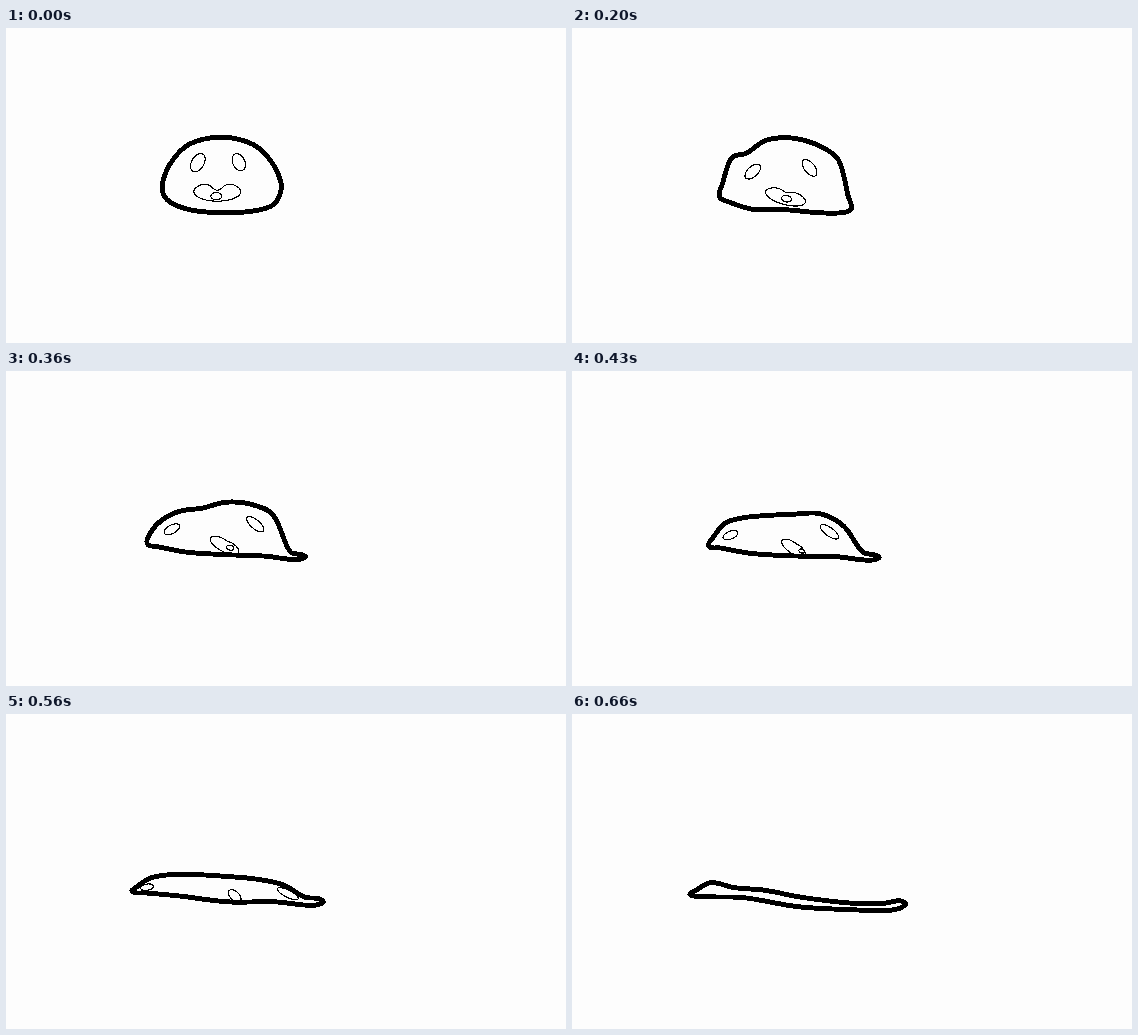
Write an HTML page that moves like this. It is 560 by 315 pixels and loops after 0.7 s.

```html
<!DOCTYPE html>
<html lang="en">
<head>
<meta charset="utf-8">
<title>Melting blob</title>
<style>
  html, body { margin: 0; width: 100%; height: 100%; overflow: hidden; background: #fdfdfd; }
  svg { display: block; width: 100vw; height: 100vh; shape-rendering: crispEdges; }
  path { fill: none; stroke: #000; stroke-width: 1.15; stroke-linejoin: round; }
  #body { stroke-width: 4.9; }
</style>
</head>
<body>
<svg viewBox="-0.3 -0.7 560 315">
  <clipPath id="inside"><path id="hull"/></clipPath>
  <path id="face" clip-path="url(#inside)"/>
  <path id="body"/>
</svg>
<script>
const LOOP = 700, LAST = 20;
const [hull, face, body] = ['hull', 'face', 'body'].map(id => document.getElementById(id));

// Key poses: left and right end, then heights along the top and the bottom
const poses = [
  { step: 0, ends: [156, 162, 275, 160], top: [145, 130, 117, 110.5, 108.5, 111, 118, 131, 146], low: [173.5, 181.5, 184, 182.5, 176] },
  { step: 3, ends: [150, 163, 276, 158], top: [157, 136, 123, 107.5, 104.5, 108, 116, 127.5, 142], low: [173, 183, 183.5, 181, 177] },
  { step: 6, ends: [147, 168, 279, 180], top: [155, 129, 124.5, 112, 109, 112, 119.5, 131.5, 167], low: [173, 180.5, 181, 184, 184] },
  { step: 11, ends: [141, 172, 299, 185.5], top: [160, 148, 139.5, 136.5, 130.5, 132.5, 143, 180, 183], low: [175, 180.5, 183, 184.5, 188] },
  { step: 15, ends: [132, 177, 314, 187], top: [172, 155, 152.5, 151, 154.5, 151.5, 166, 180.5, 183.5], low: [177.5, 183, 185.5, 185.5, 189] },
  { step: 18, ends: [123, 177, 318, 188], top: [172, 167.5, 163.5, 164.5, 165.5, 171, 172.5, 183.5, 184], low: [178.5, 180.5, 188, 188, 191.5] },
  { step: LAST, ends: [118, 180, 333, 190], top: [176, 168, 173, 175.5, 182, 186.5, 189, 188.5, 186], low: [182, 183, 192, 195, 195.5] }
];

const mix = (a, b, k) => a + (b - a) * k;
const mixAll = (a, b, k) => a.map((v, i) => mix(v, b[i], k));
const ease = p => p * p * (3 - 2 * p);
const text = p => p.map(v => v.toFixed(2)).join(' ');

// Heights get closer together towards both ends
const profile = (x0, x1, ys) =>
  ys.map((y, i) => [mix(x0, x1, (1 - Math.cos(Math.PI * (i + 1) / (ys.length + 1))) / 2), y]);

function outline(step) {
  let i = 0;
  while (i < poses.length - 2 && poses[i + 1].step <= step) i++;
  const a = poses[i], b = poses[i + 1], k = (step - a.step) / (b.step - a.step);
  const [x0, y0, x1, y1] = mixAll(a.ends, b.ends, k);
  return [
    [x0, y0], ...profile(x0, x1, mixAll(a.top, b.top, k)),
    [x1, y1], ...profile(x0, x1, mixAll(a.low, b.low, k)).reverse()
  ];
}

// Closed smooth curve, with handles a third as long as their segment
function smooth(pts) {
  const n = pts.length, at = i => pts[(i + n) % n];
  const dir = i => {
    const a = at(i - 1), b = at(i + 1), d = Math.hypot(b[0] - a[0], b[1] - a[1]);
    return [(b[0] - a[0]) / d, (b[1] - a[1]) / d];
  };
  return 'M' + text(pts[0]) + pts.map((p, i) => {
    const q = at(i + 1), u = dir(i), v = dir(i + 1);
    const h = Math.hypot(q[0] - p[0], q[1] - p[1]) / 3;
    return 'C' + [p.map((c, j) => c + u[j] * h), q.map((c, j) => c - v[j] * h), q].map(text).join(' ');
  }).join('') + 'Z';
}

// Turned ellipse; dip presses a notch into its upper edge
function oval(cx, cy, rx, ry, turn, dip = 0) {
  const r = turn * Math.PI / 180, pts = [];
  for (let i = 0; i < 40; i++) {
    const c = Math.cos(i * Math.PI / 20), s = Math.sin(i * Math.PI / 20);
    const x = rx * c, y = ry * (s + (s < 0 ? dip * Math.exp(-c * c / 0.09) : 0));
    pts.push([cx + x * Math.cos(r) - y * Math.sin(r), cy + x * Math.sin(r) + y * Math.cos(r)]);
  }
  return 'M' + pts.map(text).join('L') + 'Z';
}

// p goes from 0, upright, to 1, melted
function features(p) {
  const q = p * p;
  return [
    oval(191.5 - 24 * p - 42 * q, 134 + 41 * ease(p), 10 - 5 * q, 6.2 - 3.6 * p, -60 + 58 * p),
    oval(232.5 + 10 * p + 66 * p * q, 133.5 + 63 * q, 9 + 3 * p, 6 - 2.8 * p, 65 - 45 * p),
    oval(211 + 24 * q, 163 + 22 * p ** 1.2, 23.5 - 5 * p - 16 * q, 9.5 - 6 * p, 50 * p, 0.9 * (1 - p) ** 2),
    oval(210 + 46 * q, 167.5 + 28 * q, Math.max(0, 5.5 - 6 * q), Math.max(0, 3.6 - 4 * q), 30 * p)
  ].join('');
}

function draw(t) {
  // Drawn at thirty steps a second, each starting on a whole 10 ms
  const step = Math.min(LAST, Math.floor((Math.floor(t / 10) * 10 + 7) * 0.03));
  const d = smooth(outline(step));
  hull.setAttribute('d', d);
  body.setAttribute('d', d);
  face.setAttribute('d', step < LAST ? features(step / LAST) : '');
}

const start = performance.now();
function tick() {
  draw((performance.now() - start) % LOOP);
  requestAnimationFrame(tick);
}
tick();
</script>
</body>
</html>
```
